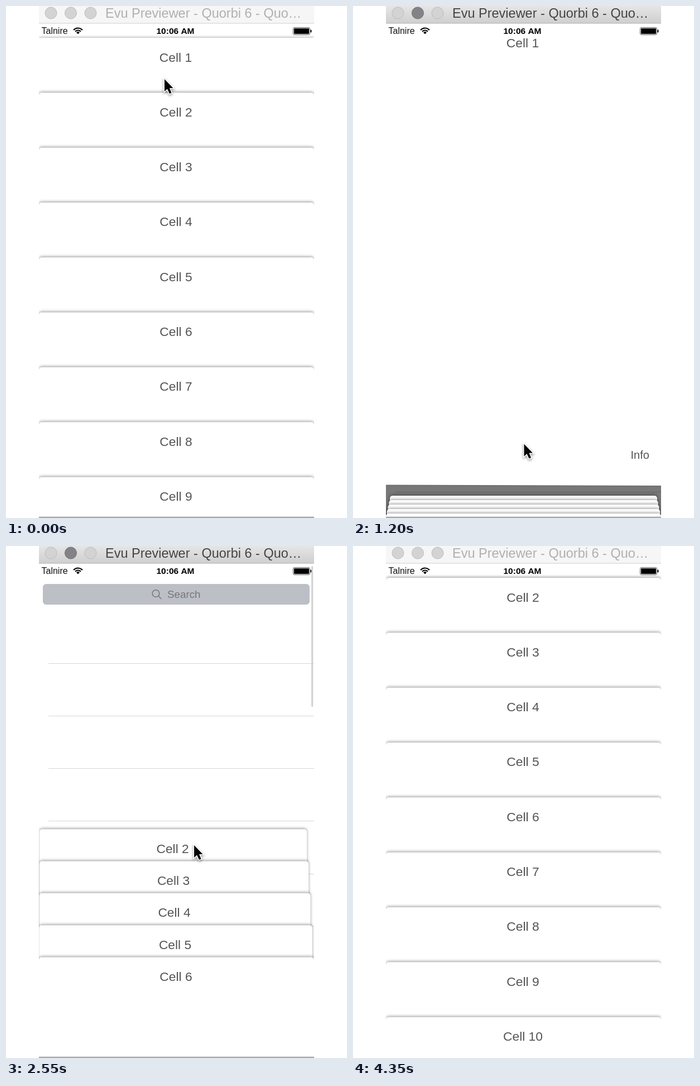
An HTML page with a canvas for the animation above (4500 ms loop, 611 by 917 pixels).

```html
<!DOCTYPE html>
<html lang="en">
<head>
<meta charset="utf-8">
<title>Card list</title>
<style>
html, body { margin: 0; width: 100%; height: 100%; overflow: hidden; background: #fff; }
canvas { display: block; width: 611px; height: 917px; }
</style>
</head>
<body>
<canvas id="stage" width="611" height="917"></canvas>
<script>
const ctx = document.getElementById('stage').getContext('2d');
const LOOP = 4500, STEP = 150;
const LEFT = 59, RIGHT = 552, WIDTH = RIGHT - LEFT, BOTTOM = 917, MID = 304.5;
const FIRST_TOP = 57, ROW = 98.33;
const STACK_TOP = 877, STACK_GAP = 8, STACKED = 5;
const FONT = '"Liberation Sans", Arial, sans-serif';

const mix = (a, b, p) => a + (b - a) * p;
const smooth = p => p * p * (3 - 2 * p);
const ramp = (t, from, to) => Math.min(1, Math.max(0, (t - from) / (to - from)));
const ease = (t, from, to) => smooth(ramp(t, from, to));

// Progress of each gesture
const opening = t => ease(t, 150, 750);
const dismissal = t => ramp(t, 1650, 2100) ** 2;
const fanning = t => ease(t, 2250, 2892);

function text(str, x, y, size, color, align = 'center', weight = '') {
  ctx.font = `${weight} ${size}px ${FONT}`;
  ctx.fillStyle = color;
  ctx.textAlign = align;
  ctx.fillText(str, x, y);
}

function rect(x, y, w, h, color) {
  ctx.fillStyle = color;
  ctx.fillRect(x, y, w, h);
}

function rounded(x, y, w, h, r, color) {
  ctx.beginPath();
  ctx.roundRect(x, y, w, h, r);
  ctx.fillStyle = color;
  ctx.fill();
}

function cardLabel(n, x, top) {
  text('Cell ' + n, x, top + 42.5, 22.8, '#555');
}

function withShadow(draw) {
  ctx.save();
  ctx.shadowColor = 'rgba(0,0,0,.38)';
  ctx.shadowBlur = 5;
  ctx.shadowOffsetY = -1.5;
  draw();
  ctx.restore();
}

function searchList() {
  rounded(66, 68, 478, 37, 6, '#bdbfc6');
  ctx.strokeStyle = '#77787d';
  ctx.lineWidth = 1.6;
  ctx.beginPath();
  ctx.arc(268.5, 85, 6.3, 0, Math.PI * 2);
  ctx.moveTo(273, 89.5);
  ctx.lineTo(278.5, 95);
  ctx.stroke();
  text('Search', 289, 93, 18.8, '#77787d', 'left');
  for (let i = 0; i < 8; i++) rect(76, Math.round(209.5 + i * 94.3), RIGHT - 76, 1, '#d6d6d6');
}

function openCard(t) {
  const top = FIRST_TOP - 26 * opening(t) + 930 * dismissal(t);
  const tilt = Math.sin(Math.PI * ramp(t, 300, 1300));
  const bottom = top + 827;
  withShadow(() => {
    ctx.beginPath();
    ctx.moveTo(LEFT, top);
    ctx.lineTo(RIGHT, top);
    ctx.lineTo(RIGHT, bottom + 3 * tilt);
    ctx.lineTo(LEFT, bottom - 2 * tilt);
    ctx.fillStyle = '#fff';
    ctx.fill();
  });
  cardLabel(1, MID - 0.5, top);
  text('Info', 513.7 + 1.5 * tilt, top + 779 + 2 * tilt, 20, '#555');
}

function deck(t) {
  const fan = fanning(t);
  const stacked = opening(t) * (1 - fan);
  const listTop = t < 1650 ? FIRST_TOP + ROW : FIRST_TOP;
  const top = mix(listTop, STACK_TOP, stacked);
  const gap = mix(STACK_GAP, ROW, (1 - stacked) ** 0.76);
  const inset = 1.75 * Math.min(1, 2 * stacked);
  const skew = 1.5 * Math.sin(Math.PI * fan);
  const shade = opening(t) * (1 - ramp(t, 900, 1200));

  for (let k = 0; k < 9; k++) {
    const depth = Math.max(0, STACKED - 1 - k);
    const y = top + gap * k + (k < STACKED ? 0 : 300 * stacked);
    if (y > BOTTOM + 5) break;
    const x = LEFT + depth * (inset - skew);
    const w = WIDTH - 2 * depth * inset;
    const grey = Math.round(255 - 130 * smooth(depth / 4) * shade);
    withShadow(() => rounded(x, y, w, BOTTOM + 60 - y, [5, 5, 0, 0], `rgb(${grey},${grey},${grey})`));
    cardLabel(k + 2, MID - depth * skew, y);
  }
}

function statusBar() {
  text('Talnire', 63.5, 50, 16, '#111', 'left');
  text('10:06 AM', 303.5, 50, 15.5, '#000', 'center', 'bold');
  const wave = r => ctx.arc(129, 50, r, -Math.PI * .77, -Math.PI * .23);
  ctx.strokeStyle = ctx.fillStyle = '#000';
  ctx.lineWidth = 2.2;
  for (const r of [6.5, 10.5]) {
    ctx.beginPath();
    wave(r);
    ctx.stroke();
  }
  ctx.beginPath();
  ctx.moveTo(129, 50.5);
  wave(4);
  ctx.fill();

  ctx.strokeStyle = '#555';
  ctx.lineWidth = 1;
  ctx.beginPath();
  ctx.roundRect(514.5, 38.5, 30, 13, 2.5);
  ctx.stroke();
  rounded(516, 40, 27, 10, 1, '#000');
  rounded(545.5, 42.5, 2, 5, 1, '#000');
}

function titleBar(active) {
  let fill = '#f6f6f6';
  if (active) {
    fill = ctx.createLinearGradient(0, 0, 0, 31);
    fill.addColorStop(0, '#e5e5e5');
    fill.addColorStop(1, '#cfcfcf');
  }
  rect(LEFT, 0, WIDTH, 31, fill);
  rect(LEFT, 30.5, WIDTH, 1, active ? '#b2b2b2' : '#d0d0d0');
  for (let i = 0; i < 3; i++) {
    const dark = active && i === 1;
    ctx.beginPath();
    ctx.arc(80.5 + 35.5 * i, 12.5, 10.5, 0, Math.PI * 2);
    ctx.fillStyle = dark ? '#838387' : '#d3d3d3';
    ctx.strokeStyle = dark ? '#6f6f73' : '#bcbcbc';
    ctx.lineWidth = 1;
    ctx.fill();
    ctx.stroke();
  }
  text('Evu Previewer - Quorbi 6 - Quo…', 178, 21, 23.5, active ? '#444' : '#b0b0b0', 'left');
}

function cursor(t) {
  const click = ease(t, 300, 900), rest = ease(t, 900, 1500);
  const pull = ramp(t, 1650, 2100), lift = fanning(t);
  ctx.save();
  ctx.translate(
    284 + 36 * click - 27 * rest - 15 * pull + 131 * lift,
    131 + 652 * click + 3 * rest + 94 * pull - 763 * lift
  );
  ctx.beginPath();
  [[0, 0], [0, 22], [5, 17.5], [9, 26], [12.5, 24.5], [9, 16], [15.5, 16]]
    .forEach(([x, y]) => ctx.lineTo(x, y));
  ctx.closePath();
  ctx.shadowColor = 'rgba(0,0,0,.45)';
  ctx.shadowBlur = 4;
  ctx.shadowOffsetY = 2;
  ctx.strokeStyle = '#fff';
  ctx.lineWidth = 3;
  ctx.stroke();
  ctx.shadowColor = 'transparent';
  ctx.fillStyle = '#000';
  ctx.fill();
  ctx.restore();
}

function draw(t) {
  const active = t >= 150 && t < 3300;
  rect(0, 0, 611, BOTTOM, '#fff');
  ctx.save();
  ctx.beginPath();
  ctx.rect(LEFT, 0, WIDTH, BOTTOM);
  ctx.clip();
  searchList();
  const dim = .53 * ramp(t, 150, 450) * (1 - ramp(t, 1650, 2100));
  rect(LEFT, 31, WIDTH, BOTTOM - 31, `rgba(0,0,0,${dim})`);
  if (t < 2100) openCard(t);
  deck(t);
  statusBar();
  if (t >= 2400 && t < 3300) rounded(547.2, 36, 3, 252, 1.5, '#d0d0d0');
  titleBar(active);
  if (t < 4050) {
    rect(LEFT, 915, WIDTH, 1.5, '#6a6a6a');
    rect(LEFT, 916.5, WIDTH, 1, '#fff');
  }
  if (t < 3300) cursor(t);
  ctx.restore();
}

const start = performance.now();
function tick() {
  const t = (performance.now() - start) % LOOP;
  draw(Math.floor(t / STEP) * STEP);
  requestAnimationFrame(tick);
}
tick();
</script>
</body>
</html>
```
